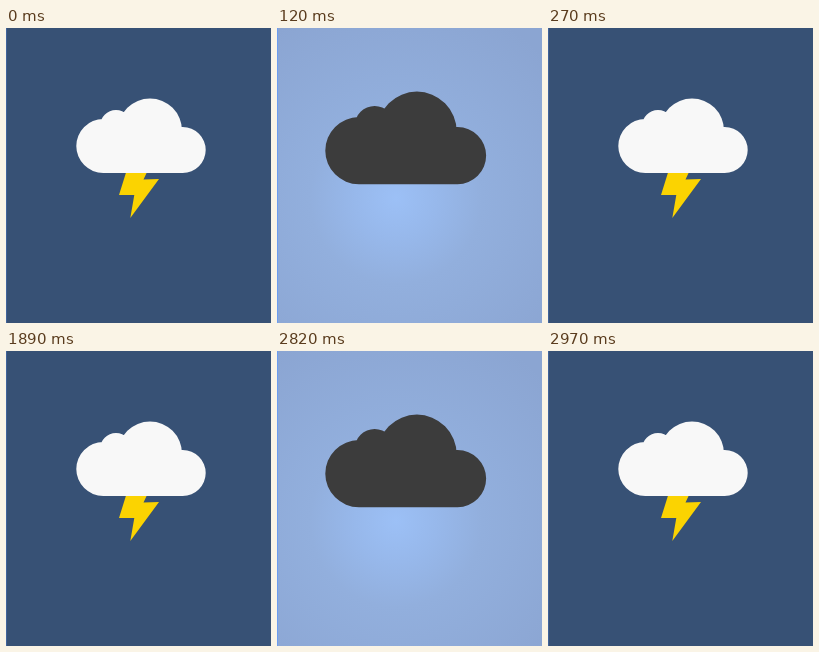
An HTML page with a canvas that plays this animation: 265x295 px, repeating every 5.37 s.

```html
<!DOCTYPE html>
<html lang="en">
<head>
<meta charset="utf-8">
<title>Thunder cloud</title>
<style>
  html, body { margin: 0; width: 100%; height: 100%; overflow: hidden; background: #375175; }
  canvas { display: block; }
</style>
</head>
<body>
<canvas id="stage" width="265" height="295"></canvas>
<script>
const W = 265, H = 295, LOOP = 5370;
const ctx = document.getElementById('stage').getContext('2d');

// Each burst flickers on and off; times are relative to the burst origin.
const BURSTS = [0, 2700];
const FLASHES = [[60, 90], [120, 150], [210, 270]];

const PUFFS = [[97.3, 118, 27], [110, 98, 16], [144, 102.5, 32], [176.7, 122, 23]];
const BOLT = [[120.5, 143], [141.5, 143], [137.5, 151.5], [153, 151], [124.3, 190], [128.3, 167], [113, 167]];

const cloud = new Path2D();
for (const [x, y, r] of PUFFS) {
  cloud.moveTo(x + r, y);
  cloud.arc(x, y, r, 0, Math.PI * 2);
}
cloud.rect(97, 105, 80, 40);

const bolt = new Path2D();
BOLT.forEach(([x, y]) => bolt.lineTo(x, y));
bolt.closePath();

const glow = ctx.createRadialGradient(119, 170, 0, 119, 170, 205);
glow.addColorStop(0, '#9cc0f6');
glow.addColorStop(0.2, '#97b8eb');
glow.addColorStop(0.42, '#92afdd');
glow.addColorStop(1, '#8ba5d2');

function drawBackdrop(fill, edge) {
  ctx.fillStyle = fill;
  ctx.fillRect(0, 0, W, H);
  ctx.fillStyle = edge;
  ctx.fillRect(0, 0, 1, H);
}

function drawCalm() {
  drawBackdrop('#375175', '#40639b');
  ctx.fillStyle = '#fbd301';
  ctx.fill(bolt);
  ctx.fillStyle = '#f8f8f8';
  ctx.fill(cloud);
}

function drawFlash() {
  drawBackdrop(glow, '#6d9df0');
  ctx.save();
  ctx.translate(48.3, 63.6);
  ctx.scale(1.243, 1.243);
  ctx.translate(-70.3, -70.5);
  ctx.fillStyle = '#3c3c3c';
  ctx.fill(cloud);
  ctx.restore();
}

function isFlash(t) {
  return BURSTS.some(start => FLASHES.some(([on, off]) => t >= start + on && t < start + off));
}

const origin = performance.now();

function render(now) {
  const t = Math.max(0, now - origin) % LOOP;
  if (isFlash(t)) drawFlash();
  else drawCalm();
  requestAnimationFrame(render);
}

render(origin);
</script>
</body>
</html>
```
